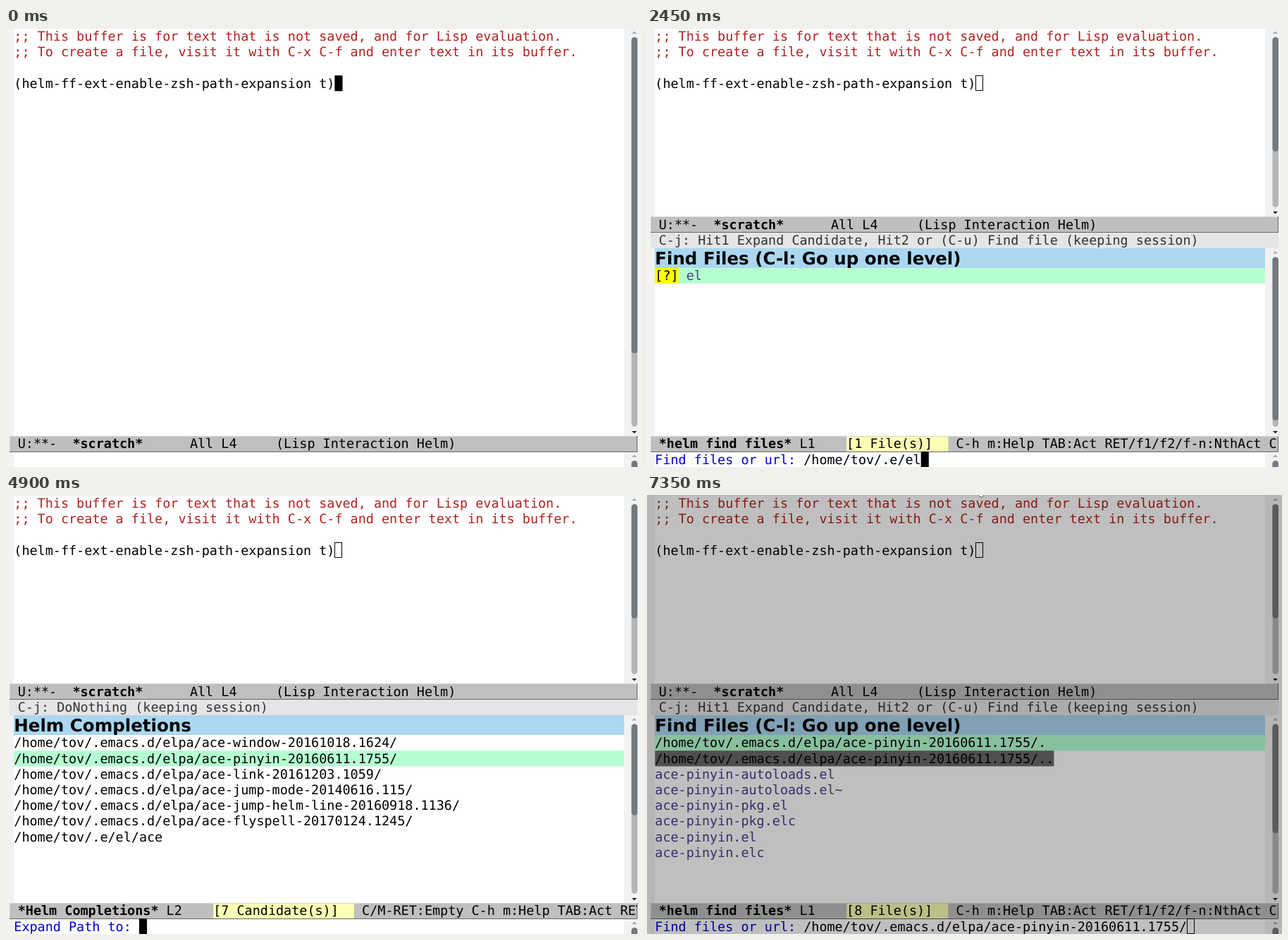
Recreate the animation shown at these times as an HTML page. Size 901 px wide and 622 px high, loop 7560 ms.

```html
<!DOCTYPE html>
<html lang="en">
<head>
<meta charset="utf-8">
<title>Path expansion in Helm</title>
<style>
  html, body { margin: 0; width: 100%; height: 100%; overflow: hidden; background: #f2f2f2; }
  svg { display: block; width: 100%; height: 100%; }
  text { font: 18.44px "DejaVu Sans Mono", monospace; white-space: pre; text-rendering: geometricPrecision; }
  .bold { font-weight: bold; }
  .title { font: bold 24.5px "DejaVu Sans", sans-serif; }
</style>
</head>
<body>
<svg id="stage" viewBox="0 0 901 622"></svg>
<script>
const LOOP = 7560;
const CELL = 11.1, LINE = 22.2;
const LEFT = 11.3, BAR_LEFT = 5.6, RIGHT = 877;
const LIST_TOP = 340, BAR_TOP = 578, MINI_TOP = 600.2;
const HOME = '/home/tov/';
const PACKAGE = HOME + '.emacs.d/elpa/ace-pinyin-20160611.1755/';

const FACES = {
  plain: { fill: '#000' },
  file: { fill: '#483d8b' },
  dir: { fill: '#8b0000', back: '#d3d3d3' },
  dots: { fill: '#000', back: '#696969' },
  missing: { fill: '#483d8b' },
};
const rows = (face, names) => names.map(name => ({ face, name }));
const missing = name => rows('missing', [name]);

const homeRows = [
  ...rows('dots', [HOME + '.', HOME + '..']),
  ...rows('dir', ['.AndroidStudio1.2', '.AndroidStudio1.3', '.AndroidStudio1.5', '.AndroidStudio2.2',
    '.QtWebEngineProcess', '.Skype']),
  ...rows('file', ['.Xauthority']),
  ...rows('dir', ['.adobe', '.akregator']),
];
const partialRows = [
  ...missing('.e'),
  ...rows('dir', ['.emacs.d', '.adobe', '.Skype', '.akregator', '.QtWebEngineProcess']),
];
const expansionRows = rows('plain', [
  ...['window-20161018.1624', 'pinyin-20160611.1755', 'link-20161203.1059', 'jump-mode-20140616.115',
    'jump-helm-line-20160918.1136', 'flyspell-20170124.1245'].map(p => `${HOME}.emacs.d/elpa/ace-${p}/`),
  HOME + '.e/el/ace',
]);
const packageRows = [
  ...rows('dots', [PACKAGE + '.', PACKAGE + '..']),
  ...rows('file', ['autoloads.el', 'autoloads.el~', 'pkg.el', 'pkg.elc'].map(s => 'ace-pinyin-' + s)),
  ...rows('file', ['ace-pinyin.el', 'ace-pinyin.elc']),
];

const findFiles = {
  helm: true, hint: 'C-j: Hit1 Expand Candidate, Hit2 or (C-u) Find file (keeping session)',
  title: 'Find Files (C-l: Go up one level)', buffer: '*helm find files*', unit: 'File(s)', pad: 13,
  keys: 'C-h m:Help TAB:Act RET/f1/f2/f-n:NthAct C', prompt: 'Find files or url: ', selected: 0,
};
const completions = {
  hint: 'C-j: DoNothing (keeping session)', title: 'Helm Completions', buffer: '*Helm Completions*',
  unit: 'Candidate(s)', pad: 18, keys: 'C/M-RET:Empty C-h m:Help TAB:Act RET', prompt: 'Expand Path to: ',
};
const typed = tail => ({ input: HOME + tail, cursor: 'solid' });
const list = (items, count, thumbEnd, selected = 0) => ({ items, count, thumbEnd, selected });

// Each entry changes part of the state from its time on.
const timeline = [
  [0, { cursor: 'solid' }],
  [210, { cursor: 'none' }],
  [770, { ...findFiles, ...typed(''), ...list(homeRows, 156, 371) }],
  [1260, { cursor: 'none' }],
  [1540, typed('.')],
  [1610, list(homeRows, 113, 390)],
  [1750, { ...typed('.e'), ...list(partialRows, 52, 440, 1) }],
  [1890, typed('.e/')],
  [1960, list(missing('.e'), 1, 556)],
  [2240, typed('.e/e')],
  [2310, list(missing('e'), 1, 556)],
  [2450, { ...typed('.e/el'), items: missing('el') }],
  [2730, typed('.e/el/')],
  [3080, { ...typed('.e/el/a'), items: missing('a') }],
  [3360, { ...typed('.e/el/ac'), items: missing('ac') }],
  [3570, { ...typed('.e/el/ace'), items: missing('ace') }],
  [3990, { ...completions, input: '', ...list(expansionRows, 7, 454) }],
  [4900, { selected: 1 }],
  [5600, { ...findFiles, input: PACKAGE, ...list(missing('ace'), 1, 556) }],
  [5670, list(packageRows, 8, 479)],
  [6160, { cursor: 'none' }],
  [6650, { cursor: 'solid' }],
  [6790, { pointer: -2 }],
  [7210, { cursor: 'none' }],
  [7350, { cursor: 'hollow', dim: true, pointer: 0 }],
];

const rect = (x, y, w, h, fill, extra = '') =>
  `<rect x="${x}" y="${y}" width="${w}" height="${h}" fill="${fill}" ${extra}/>`;
const text = (x, top, string, fill = '#000', style = '') =>
  `<text x="${x}" y="${top + 17.4}" fill="${fill}" class="${style}">${string}</text>`;
const barText = (col, top, string, style) => text(BAR_LEFT + col * CELL, top, string, '#000', style);

function cursorAt(col, top, kind) {
  const x = LEFT + col * CELL;
  if (kind === 'solid') return rect(x, top, CELL, LINE, '#000');
  if (kind === 'hollow') return rect(Math.round(x) + .5, Math.round(top) + .5, 10, 21, 'none', 'stroke="#000"');
  return '';
}

function scrollbar(top, thumbEnd, bottom) {
  const pill = (end, fill) => rect(887.5, top + 13, 8.5, end - top - 13, fill, 'rx="4.2"');
  return `<path d="M888 ${top + 8}l3.5 -3.5 3.5 3.5z" fill="#aaa"/>` +
    pill(bottom - 13, '#b6b6b6') + pill(thumbEnd, '#76797b') +
    `<path d="M888 ${bottom - 7}l3.5 3.5 3.5 -3.5z" fill="#222"/>`;
}

function modeLine(top, content) {
  const y = Math.round(top);
  return rect(5, y, 891, 23, '#bfbfbf') +
    `<path d="M5.5 ${y + 22}V${y + .5}H895" fill="none" stroke="#d6d6d6"/>` +
    `<path d="M5 ${y + 22.5}H895.5V${y}" fill="none" stroke="#666"/>` + content;
}

function scratchWindow(top, state) {
  const bar = barText(1, top, 'U:**-') + barText(8, top, '*scratch*', 'bold') +
    barText(23, top, 'All L4     (Lisp Interaction Helm)');
  return rect(0, 0, 901, 1, '#ededed') +
    text(LEFT, .7, ';; This buffer is for text that is not saved, and for Lisp evaluation.', '#b22222') +
    text(LEFT, .7 + LINE, ';; To create a file, visit it with C-x C-f and enter text in its buffer.', '#b22222') +
    text(LEFT, .7 + 3 * LINE, '(helm-ff-ext-enable-zsh-path-expansion t)') +
    cursorAt(41, 67.2, state.helm ? 'hollow' : state.cursor) +
    scrollbar(0, state.helm ? 175 : 461, top) + modeLine(top, bar);
}

function candidate({ face, name }, index, selected) {
  const top = LIST_TOP + index * LINE, { fill, back } = FACES[face];
  let out = '', x = LEFT;
  if (index === selected) out += rect(11, top, RIGHT - 11, LINE, '#b5ffd1');
  else if (back) out += rect(LEFT, top, name.length * CELL, LINE, back);
  if (face === 'missing') {
    out += rect(LEFT, top, 3 * CELL, LINE, '#ff0') + text(LEFT, top, '[?]');
    x += 4 * CELL;
  }
  return out + text(x, top, name, fill);
}

function helmWindow(s) {
  const lineCol = s.buffer.length + 2, countCol = lineCol + 6;
  const bar = barText(1, BAR_TOP, s.buffer, 'bold') + barText(lineCol, BAR_TOP, 'L' + (s.selected + 1)) +
    rect(BAR_LEFT + countCol * CELL, BAR_TOP + 1, s.pad * CELL, 21, '#faffb5') +
    barText(countCol, BAR_TOP, `[${s.count} ${s.unit}]`) + barText(countCol + s.pad + 1, BAR_TOP, s.keys);
  return rect(5, 290, 891, 22, '#e5e5e5') + text(BAR_LEFT + CELL, 289.3, s.hint, '#333') +
    rect(11, 312, RIGHT - 11, 28, '#abd7f0') + text(LEFT, 317.6, s.title, '#000', 'title') +
    s.items.map((item, i) => candidate(item, i, s.selected)).join('') +
    scrollbar(311.5, s.thumbEnd, BAR_TOP) + modeLine(BAR_TOP, bar) +
    text(LEFT, MINI_TOP, s.prompt, '#0000cd') +
    text(LEFT + s.prompt.length * CELL, MINI_TOP, s.input) +
    cursorAt(s.prompt.length + s.input.length, MINI_TOP, s.cursor);
}

function draw(s) {
  let out = '<clipPath id="frame"><rect width="896" height="622"/></clipPath>' +
    rect(0, 0, 901, 622, '#f2f2f2') + rect(11, 0, RIGHT - 11, 622, '#fff') +
    '<g clip-path="url(#frame)">' + scratchWindow(s.helm ? 267.1 : BAR_TOP, s) +
    (s.helm ? helmWindow(s) : '') + scrollbar(600, 660, 680) + '</g>';
  if (s.dim) out += rect(0, 0, 901, 622, '#000', 'opacity=".25"');
  if (s.pointer !== undefined)
    out += `<ellipse cx="474" cy="${s.pointer}" rx="3.5" ry="3" fill="#fff" stroke="#555"/>`;
  return out;
}

const stage = document.getElementById('stage');
let shown = -1;

function tick() {
  const time = performance.now() % LOOP;
  const passed = timeline.filter(([at]) => at <= time);
  if (passed.length !== shown) {
    shown = passed.length;
    stage.innerHTML = draw(Object.assign({}, ...passed.map(([, change]) => change)));
  }
  requestAnimationFrame(tick);
}
tick();
</script>
</body>
</html>
```
